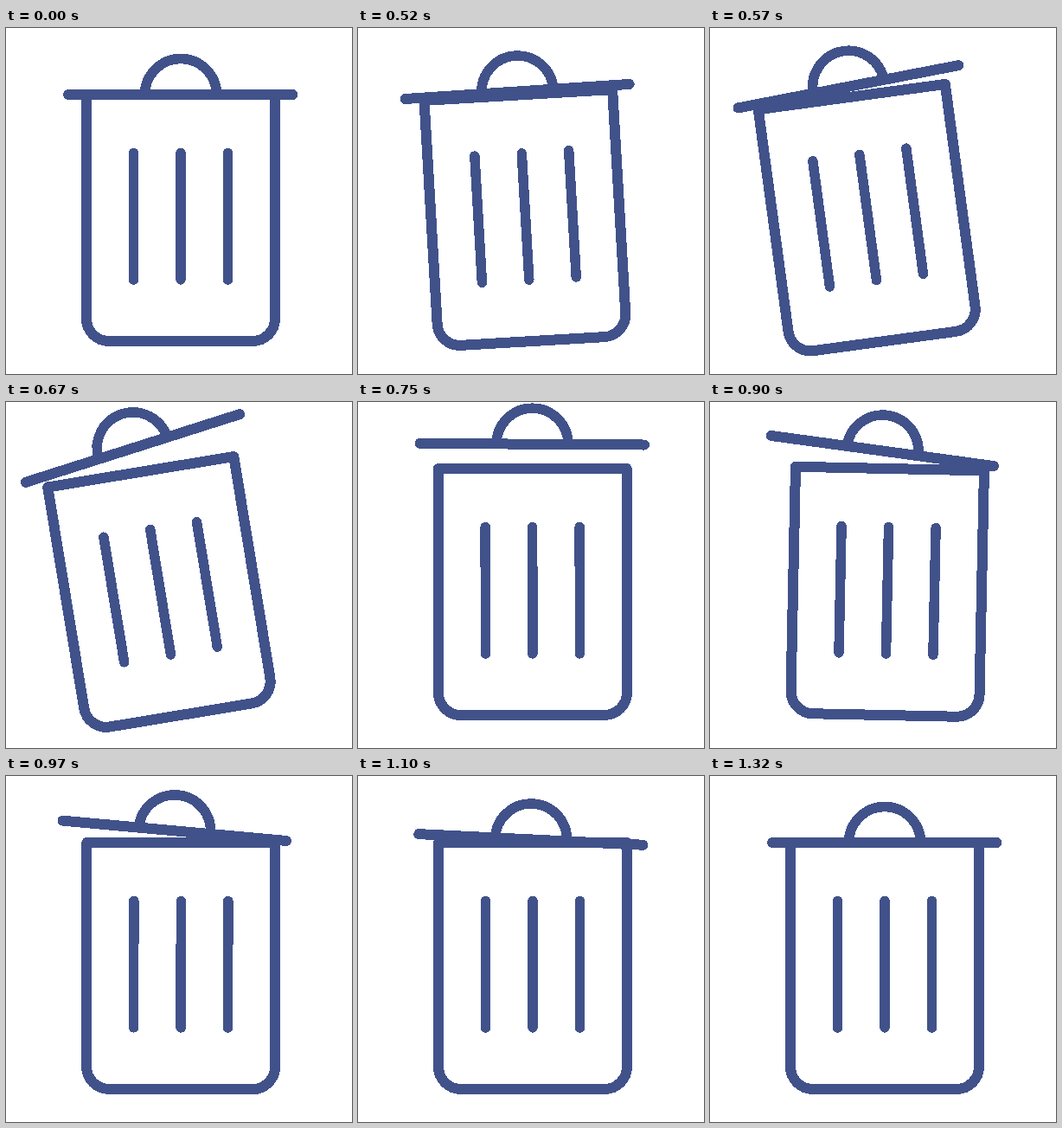
An HTML page for the animation above (1.35 s loop, 400 by 400 pixels).

```html
<!DOCTYPE html>
<html lang="en">
<head>
<meta charset="utf-8">
<title>Trash can</title>
<style>
  html, body { margin: 0; width: 100%; height: 100%; overflow: hidden; background: #fff; }
  svg { display: block; width: 100%; height: 100%; shape-rendering: crispEdges; }
  g { fill: none; stroke: #41528a; stroke-width: 12; stroke-linecap: round; stroke-linejoin: round; }
  .thin { stroke-width: 11.5; }
</style>
</head>
<body>
<svg viewBox="0 0 400 400">
  <g id="can">
    <path d="M93 77H311V336A26 26 0 0 1 285 362H119A26 26 0 0 1 93 336Z"/>
    <path class="thin" d="M147.5 144.5V291M202 144.5V291M256.5 144.5V291"/>
    <g id="lid">
      <path d="M72 77H331.5"/>
      <path class="thin" d="M160.5 77A41.5 41.5 0 0 1 243.5 77"/>
    </g>
  </g>
</svg>
<script>
const LOOP = 1350;
const can = document.getElementById('can');
const lid = document.getElementById('lid');

const linear = u => u;
const swing = u => (1 - Math.cos(Math.PI * u)) / 2;
const settle = power => u => 1 - (1 - u) ** power;

// The motion advances 40 times a second, on alternating 20 and 30 ms ticks
const snap = t => Math.floor(t / 50) * 50 + (t % 50 >= 20 ? 25 : 0);

function draw(now) {
  const t = snap(now % LOOP);
  const ramp = (from, to, ease) => ease(Math.min(1, Math.max(0, (t - from) / (to - from))));

  // The can tips left, swings over to the right and settles
  const rock = -9.7 * ramp(500, 660, settle(2.5))
             + 14.7 * ramp(660, 810, swing)
             - 5 * ramp(810, 1017, settle(2.5));

  // The lid hops up, tilts both ways and drops back; all relative to the can
  const tilt = -8.3 * ramp(500, 675, swing)
             + 16.6 * ramp(675, 820, swing)
             - 8.3 * ramp(820, 1325, settle(1.35));
  const lift = 28.5 * (ramp(725, 1212, swing) - ramp(500, 675, linear));
  const slide = 4.5 * (ramp(675, 755, swing) - ramp(500, 675, linear))
              + 8.9 * (ramp(900, 1190, swing) - ramp(750, 900, swing));

  can.setAttribute('transform', `rotate(${rock} 202 362)`);
  lid.setAttribute('transform', `translate(${slide} ${lift}) rotate(${tilt} 202 77)`);
}

const start = performance.now();
function tick() {
  draw(performance.now() - start);
  requestAnimationFrame(tick);
}
tick();
</script>
</body>
</html>
```
